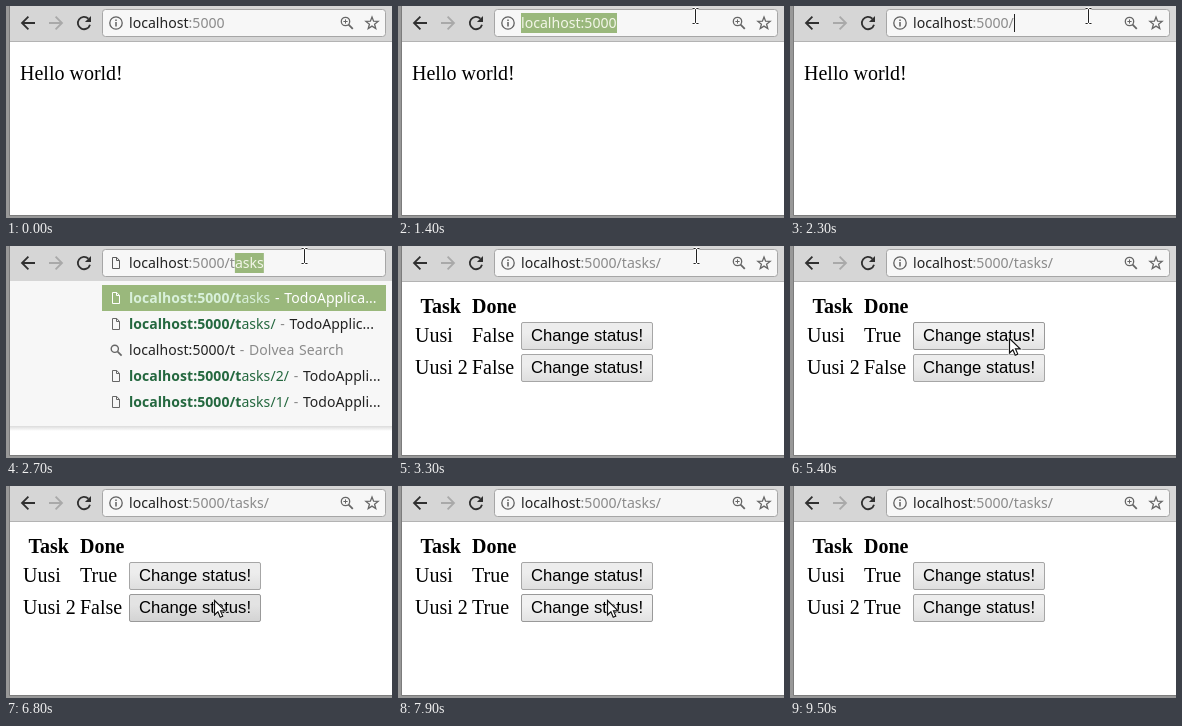
These frames come from a looping animation (386 by 212 pixels, 9.8 s). An HTML page:

```html
<!DOCTYPE html>
<html lang="en">
<head>
<meta charset="utf-8">
<title>Task list in a browser</title>
<style>
html, body { margin: 0; width: 100%; height: 100%; overflow: hidden; background: #fff; }
svg { display: block; }
text { white-space: pre; }
.ui { font: 14.1px "Noto Sans", "Open Sans", sans-serif; }
.row { font: 14px "Noto Sans", "Open Sans", sans-serif; letter-spacing: .05px; word-spacing: 1px; }
.page { font: 20px "Liberation Serif", "Times New Roman", serif; }
.btn { font: 16.67px "Liberation Sans", Arial, sans-serif; }
.b { font-weight: bold; }
</style>
</head>
<body>
<svg id="stage" width="386" height="212" viewBox="0 0 386 212">
  <defs>
    <linearGradient id="normal" x2="0" y2="1">
      <stop offset=".38" stop-color="#ededed"/><stop offset="1" stop-color="#dedede"/>
    </linearGradient>
    <linearGradient id="hover" x2="0" y2="1">
      <stop offset=".38" stop-color="#f1f1f1"/><stop offset="1" stop-color="#e2e2e2"/>
    </linearGradient>
    <linearGradient id="pressed" x2="0" y2="1">
      <stop offset=".38" stop-color="#e3e3e3"/><stop offset="1" stop-color="#d3d3d3"/>
    </linearGradient>
    <linearGradient id="shade" x2="0" y2="1">
      <stop stop-opacity=".14"/><stop offset="1" stop-opacity="0"/>
    </linearGradient>
  </defs>
  <rect width="386" height="212" fill="#fff"/>
  <g id="content"></g>
  <rect width="386" height="35" fill="#d6d6d6"/>
  <rect y="35" width="386" height="1" fill="#b3b3b3"/>
  <g id="bar"></g>
  <g id="panel"></g>
  <g id="frame">
    <path d="M0 0H3V212H0ZM0 209H386V212H0Z" fill="#989898"/>
    <path d="M3.5 0V209.5H386" fill="none" stroke="#7c7c7c"/>
  </g>
  <g id="pointer"></g>
</svg>
<script>
const LOOP = 9800, STEP = 100;
const GREEN = '#9ab87c', DARK = '#303030', INK = '#222', GREY = '#8b8b8b', LINK = '#24683f';
const MINT = '#d8f0da', PICKED = '#f3f6e8';
const HOST = 'localhost', PORT = ':5000';
const byId = id => document.getElementById(id);
const pen = document.createElement('canvas').getContext('2d');

const rect = (x, y, w, h, fill, more = '') =>
  `<rect x="${x}" y="${y}" width="${w}" height="${h}" fill="${fill}" ${more}/>`;
const text = (x, y, cls, s, fill = '#000') =>
  `<text x="${x}" y="${y}" class="${cls}" fill="${fill}">${s}</text>`;
const span = (s, fill, cls = '') => `<tspan class="${cls}" fill="${fill}">${s}</tspan>`;
const line = (d, color, w = 1.3, fill = 'none') =>
  `<path d="${d}" stroke="${color}" stroke-width="${w}" fill="${fill}"/>`;
const place = (x, y, s, body) => `<g transform="translate(${x} ${y}) scale(${s})">${body}</g>`;

function urlWidth(s) {
  pen.font = '14.1px "Noto Sans", "Open Sans", sans-serif';
  return pen.measureText(s).width;
}

// Icons are drawn around their own centre.
const icon = {
  back: c => line('M7 0H-6M0.4 -6.4L-6 0L0.4 6.4', c, 1.8),
  reload: c => line('M4.4 -4.4A6.2 6.2 0 1 0 6 1.7', c, 1.8) +
    `<path d="M7 -7V-0.9H0.9Z" fill="${c}"/>`,
  stop: c => line('M-5 -5L5 5M5 -5L-5 5', c, 1.9),
  info: c => `<circle r="6.2" fill="none" stroke="${c}" stroke-width="1.3"/>` +
    line('M0 -0.9V3.4M0 -3.5V-2', c, 1.5),
  doc: c => line('M-3.5 -5.5H0.8L3.5 -2.5V5.5H-3.5ZM0.5 -5.5V-2.5H3.5', c, 1),
  search: c => `<circle cx="-1.2" cy="-1.2" r="3.6" fill="none" stroke="${c}" stroke-width="1.4"/>` +
    line('M1.6 1.6L5.6 5.6', c, 1.7),
  zoom: c => `<circle cx="-1.5" cy="-1.5" r="4.2" fill="none" stroke="${c}" stroke-width="1.3"/>` +
    line('M1.6 1.6L5.8 5.8', c, 1.8) + line('M-3.6 -1.5H0.6M-1.5 -3.6V0.6', c, 1),
  star: c => {
    const p = Array.from({ length: 10 }, (_, i) => {
      const a = i * Math.PI / 5, r = i % 2 ? 2.7 : 6.4;
      return (r * Math.sin(a)).toFixed(2) + ' ' + (0.4 - r * Math.cos(a)).toFixed(2);
    });
    return line('M' + p.join('L') + 'Z', c, 1.3);
  }
};

// Pointer stops: [time, x, y]; it glides between neighbours.
const track = [
  [700, 335, 24], [1200, 302, 11], [1400, 297.5, 10], [2200, 297.5, 10], [2300, 298.5, 10],
  [4100, 298.5, 10], [4400, 282, 44], [4700, 260, 82], [4800, 260, 82], [4900, 267, 90],
  [5100, 219, 92], [5800, 219, 92], [6100, 208, 114], [7400, 208, 114], [7600, 209, 115],
  [7700, 209, 115], [7900, 209, 114], [8100, 209, 114], [8600, 150, 64], [9100, 83, 3],
  [9300, 75, -4], [9500, 73, -18]
];

function pointerAt(t) {
  if (t < 700 || t >= 9500) return null;
  const i = track.findIndex(k => k[0] > t);
  const [t0, x0, y0] = track[i - 1], [t1, x1, y1] = track[i];
  const u = (t - t0) / (t1 - t0);
  return { x: x0 + (x1 - x0) * u, y: y0 + (y1 - y0) * u };
}

function drawPointer(p) {
  if (!p) return '';
  if (p.y > 3 && p.y < 31 && p.x > 120 && p.x < 330) {
    const d = 'M-3 -7.5H-1L0 -6.5L1 -7.5H3M0 -6.5V6.5M-3 7.5H-1L0 6.5L1 7.5H3';
    return place(p.x, p.y, 1, line(d, '#fff', 2.4) + line(d, '#222', 1));
  }
  const d = 'M0.5 0.5V15L3.9 11.8L6.2 17.2L8.8 16.1L6.5 10.9H11.2Z';
  return place(p.x, p.y, 1, line(d, '#fff', 2) + line(d, '#111', 1.2, '#fff'));
}

// Text typed after the port while the address is edited.
function typedAt(t) {
  if (t < 2200 || t >= 3300) return '';
  if (t < 2700) return '/';
  return '/task'.slice(0, t < 2800 ? 2 : t < 2900 ? 3 : t < 3100 ? 4 : 5);
}

function drawBar(t) {
  const open = t >= 2500 && t < 3300, all = t >= 1300 && t < 1900;
  const typed = typedAt(t), rest = open && typed.length > 1 ? '/tasks'.slice(typed.length) : '';
  const tail = t >= 3300 ? '/tasks/' : typed;
  const end = 123 + urlWidth(HOST + PORT + tail);
  let s = place(22, 17, 1, icon.back(DARK)) + place(50, 17, '-1 1', icon.back('#a9a9a9')) +
    place(78, 17, 1, t >= 6900 && t < 7000 ? icon.stop(DARK) : icon.reload(DARK)) +
    rect(96.5, 3.5, 283, 27, '#f7f7f7', 'rx="3" stroke="#a6a6a6"') +
    place(110, 17, 1, open ? icon.doc('#5a5a5a') : icon.info('#606060'));
  if (!open) s += place(341, 17, 1, icon.zoom('#666')) + place(366, 17, 1, icon.star('#666'));
  if (all) s += rect(123, 7, 96, 20, GREEN);
  if (rest) s += rect(end, 7, urlWidth(rest), 20, GREEN);
  s += text(123, 22, 'ui', span(HOST, all ? PICKED : INK) +
    span(PORT + tail, all ? PICKED : GREY) + span(rest, PICKED));
  if (t >= 1900 && t < 2700) s += rect(Math.round(end), 8, 1, 18, INK);
  return s;
}

function drawRow(i, typed, path, title) {
  const y = 52 + 26 * i, hit = i === 0;
  const c = hit ? MINT : LINK;
  const body = title === 'search'
    ? span(HOST + PORT + typed, INK) + span(' - Dolvea Search', GREY)
    : span(HOST + PORT + typed, c, 'b') + span(path.slice(typed.length), c) +
      (title ? span(' - ', hit ? '#fff' : GREY) + span(title + '...', hit ? '#fff' : INK) : '');
  const kind = title === 'search' ? icon.search : icon.doc;
  return (hit ? rect(96, 39, 284, 26, GREEN) : '') +
    place(110, y, 1, kind(hit ? '#fff' : '#666')) + text(123, y + 5, 'row', body);
}

function drawPanel(t) {
  if (t < 2500 || t >= 3300) return '';
  const typed = typedAt(t);
  const rows = [['/tasks', 'TodoApplica'], ['/tasks/', 'TodoApplic'], [typed, 'search'],
    ['/tasks/2/', 'TodoAppli'], ['/tasks/1/', 'TodoAppli']];
  if (typed === '/') rows.unshift(['/', '']);
  const bottom = t < 2700 ? 195 : t < 2800 ? 180 : t < 2900 ? 173 : 169;
  return rect(4, 35, 382, bottom - 35, '#f7f7f7') + rect(4, bottom, 382, 5, 'url(#shade)') +
    rows.map(([path, title], i) => drawRow(i, typed, path, title)).join('');
}

function drawButton(y, p, down) {
  const over = p && p.x >= 123 && p.x < 255 && p.y >= y && p.y < y + 28;
  const look = over ? (down ? 'pressed' : 'hover') : 'normal';
  return rect(123.5, y + .5, 131, 27, `url(#${look})`,
    `rx="1.5" stroke="${over ? '#999' : '#a6a6a6'}"`) +
    text(133, y + 19, 'btn', 'Change status!');
}

function drawPage(t, p) {
  if (t < 3300) return text(14, 74, 'page', 'Hello world!');
  const down = t >= 5300 && t < 5400 || t >= 6800 && t < 6900;
  const task = (name, y, done) => text(17, y + 20, 'page', name) +
    text(74, y + 20, 'page', done ? 'True' : 'False') + drawButton(y, p, down);
  return text(22.5, 67, 'page b', 'Task') + text(74, 67, 'page b', 'Done') +
    task('Uusi', 76, t >= 5400) + task('Uusi 2', 108, t >= 7000);
}

function draw(t) {
  const p = pointerAt(t);
  byId('content').innerHTML = drawPage(t, p);
  byId('bar').innerHTML = drawBar(t);
  byId('panel').innerHTML = drawPanel(t);
  byId('pointer').innerHTML = drawPointer(p);
}

let last = -1;
const start = performance.now();
function tick() {
  const now = Math.max(0, performance.now() - start) % LOOP;
  const t = Math.floor(now / STEP) * STEP;
  if (t !== last) draw(last = t);
  requestAnimationFrame(tick);
}
tick();
</script>
</body>
</html>
```
